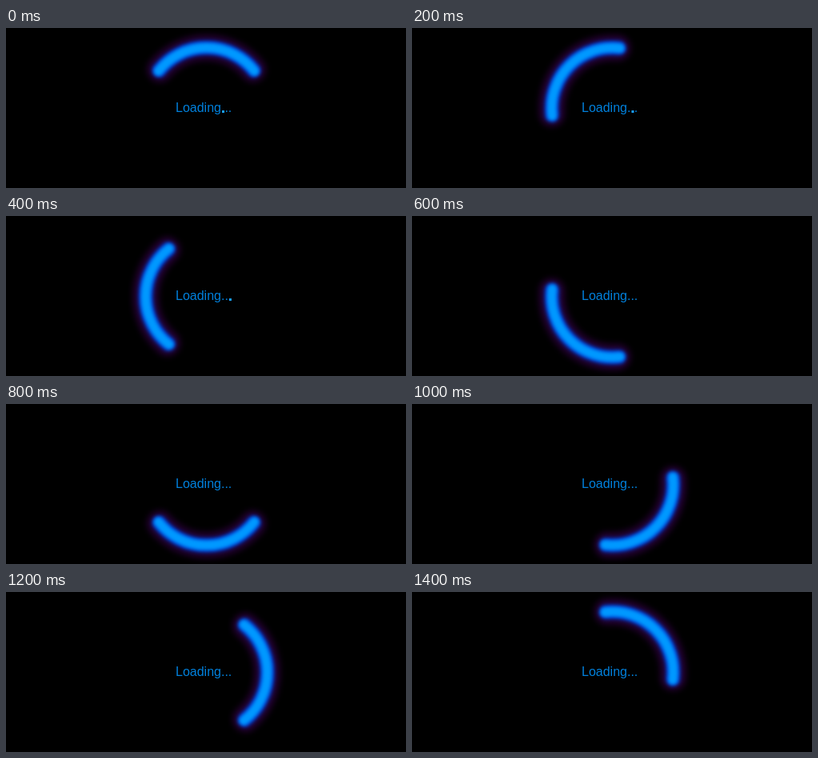
Recreate the animation shown at these times as an HTML page. Size 500 by 200 pixels, loop 1600 ms.

```html
<!DOCTYPE html>
<html lang="en">
<head>
<meta charset="utf-8">
<title>Loading</title>
<style>
  html, body { margin: 0; width: 100%; height: 100%; overflow: hidden; background: #000; }
  svg { display: block; width: 500px; height: 200px; }
  path { fill: none; stroke-linecap: round; }
  text { font: 16px "Liberation Sans", Arial, sans-serif; fill: #0080dc; }
</style>
</head>
<body>
<svg viewBox="0 0 500 200">
  <defs>
    <filter id="haze" filterUnits="userSpaceOnUse" x="-130" y="-130" width="260" height="260" color-interpolation-filters="sRGB">
      <feGaussianBlur stdDeviation="3.5"/>
    </filter>
    <filter id="glow" filterUnits="userSpaceOnUse" x="-130" y="-130" width="260" height="260" color-interpolation-filters="sRGB">
      <feGaussianBlur stdDeviation="2.8"/>
    </filter>
    <filter id="soft" filterUnits="userSpaceOnUse" x="-130" y="-130" width="260" height="260" color-interpolation-filters="sRGB">
      <feGaussianBlur stdDeviation="2"/>
    </filter>
  </defs>
  <rect width="500" height="200" fill="#000"/>
  <g id="arc">
    <path stroke="#20002c" stroke-width="33" filter="url(#haze)"/>
    <path stroke="#0038d0" stroke-width="18" filter="url(#glow)"/>
    <path stroke="#0099ff" stroke-width="12" filter="url(#soft)"/>
  </g>
  <text x="212" y="105">Loading...</text>
  <rect id="dot" y="103" width="3" height="3" fill="#1aa0ff"/>
</svg>
<script>
  const STEP = 200, STEPS = 8, RADIUS = 76;
  const arc = document.getElementById('arc');
  const dot = document.getElementById('dot');

  // Arc centred on the top of the ring, reaching `half` degrees to each side.
  function arcPath(half) {
    const a = half * Math.PI / 180;
    const x = RADIUS * Math.sin(a), y = -RADIUS * Math.cos(a);
    return `M${-x} ${y}A${RADIUS} ${RADIUS} 0 0 1 ${x} ${y}`;
  }

  [50, 51, 52].forEach((half, i) => arc.children[i].setAttribute('d', arcPath(half)));

  function draw(time) {
    const step = Math.floor(time / STEP) % STEPS;
    arc.setAttribute('transform', `translate(250.6 100.6) rotate(${-45 * step})`);
    // The bright dot passes over the ellipsis once per turn.
    dot.setAttribute('x', 270 + 4.45 * step);
    dot.setAttribute('visibility', step < 3 ? 'visible' : 'hidden');
  }

  const start = performance.now();
  function tick() {
    draw(performance.now() - start);
    requestAnimationFrame(tick);
  }
  draw(0);
  requestAnimationFrame(tick);
</script>
</body>
</html>
```
